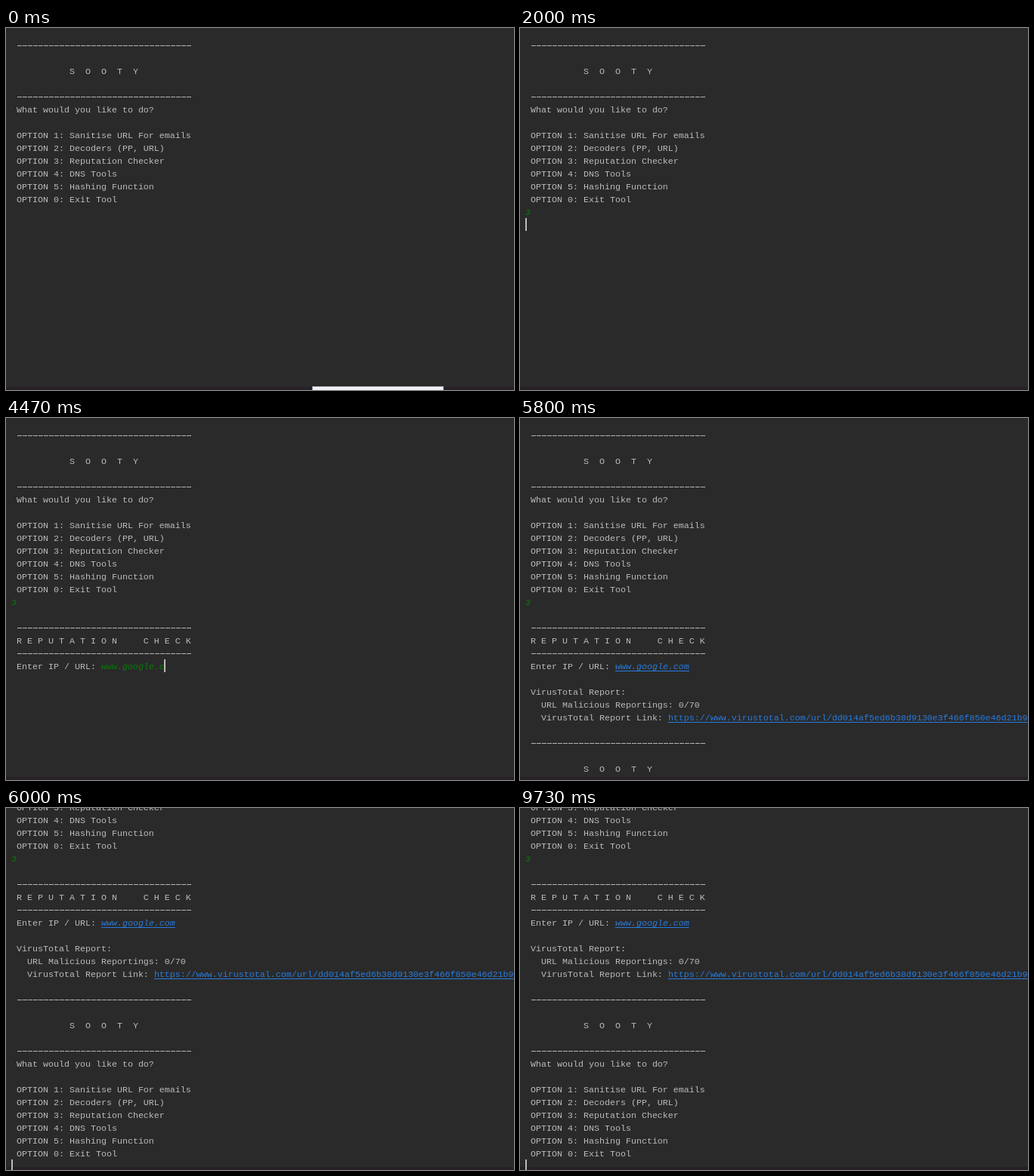
An HTML page for the animation above (9790 ms loop, 672 by 480 pixels).

```html
<!DOCTYPE html>
<html lang="en">
<head>
<meta charset="utf-8">
<title>Reputation check in a terminal</title>
<style>
  html, body { margin: 0; width: 100%; height: 100%; overflow: hidden; background: #2a2a2a; }
  #stage { position: relative; width: 672px; height: 480px; overflow: hidden; }
  #view { position: absolute; inset: 0 0 4px 0; overflow: hidden; }
  #lines {
    position: absolute; left: 7px; top: 16px;
    font: 11.665px/17px "Liberation Mono", "Courier New", monospace;
    color: #bbb; white-space: pre;
  }
  #lines div { height: 17px; }
  .rule {
    width: 231px; margin-left: 7px; color: transparent;
    background: repeating-linear-gradient(90deg, transparent 0 1px, #b4b4b4 1px 7px) 0 7px / 100% 1px no-repeat;
  }
  .input { color: #007f00; font-style: italic; }
  .link { color: #287bde; text-decoration: underline 1px; text-underline-offset: 2px; text-decoration-skip-ink: none; }
  #strip { position: absolute; left: 0; right: 0; bottom: 0; height: 4px; background: #272026; }
  #popup {
    position: absolute; left: 405px; top: 475px; width: 174px; height: 5px;
    box-sizing: border-box; border: 1px solid #a9a9b0; border-bottom: 0; background: #f1f1f5;
  }
  #caret { position: absolute; width: 2px; height: 17px; background: #bbb; }
</style>
</head>
<body>
<div id="stage">
  <div id="view"><div id="lines"></div></div>
  <div id="strip"></div>
  <div id="popup"></div>
  <div id="caret"></div>
</div>
<script>
const LOOP = 9790, TOP = 14, LEFT = 7, ROW = 17, CELL = 7;
const ADDRESS = 'www.google.com';
const REPORT = 'https://www.virustotal.com/url/dd014af5ed6b38d9130e3f466f850e46d21b9';
const $ = id => document.getElementById(id);
const rule = '-'.repeat(33);

const menu = [
  rule, '', ' '.repeat(11) + 'S  O  O  T  Y', '', rule,
  ' What would you like to do?', '',
  ' OPTION 1: Sanitise URL For emails',
  ' OPTION 2: Decoders (PP, URL)',
  ' OPTION 3: Reputation Checker',
  ' OPTION 4: DNS Tools',
  ' OPTION 5: Hashing Function',
  ' OPTION 0: Exit Tool'
];

// Output blocks: [time shown, rows]
const blocks = [
  [0, menu],
  [0, ['', '']],
  [2200, [rule, ' R E P U T A T I O N     C H E C K', rule, ' Enter IP / URL: ']],
  [5800, ['', ' VirusTotal Report:', '   URL Malicious Reportings: 0/70',
    '   VirusTotal Report Link: ', '', ...menu]]
];

const rows = [];
for (const [at, texts] of blocks) {
  for (const text of texts) {
    const el = document.createElement('div');
    el.textContent = text;
    if (text === rule) el.className = 'rule';
    $('lines').append(el);
    rows.push({ el, at });
  }
}

function addSpan(row, className, text = '') {
  const span = document.createElement('span');
  span.className = className;
  span.textContent = text;
  rows[row].el.append(span);
  return span;
}
const choice = addSpan(13, 'input');
const address = addSpan(18, 'input');
addSpan(22, 'link', REPORT);

const keyTimes = [2930, 3130, 3270, 3470, 3600, 3800, 3930, 4070, 4130, 4270, 4400, 4470, 4600, 4800];

// [time, row, column] of the caret
const caretPlaces = [[0, 13, 0], [1730, 13, 1], [2000, 14, 0], [2200, 18, 17], [5070, 19, 0], [5800, 37, 0]];
const caretSwitches = [[0, 0], [200, 1], [1270, 0], [1730, 1], [2730, 0], [2930, 1],
  [6530, 0], [7070, 1], [7600, 0], [8130, 1], [8670, 0], [9200, 1]];
const scrolls = [[0, 0], [5930, 49], [6000, 177]];

const stepAt = (steps, t) => steps.findLast(([at]) => at <= t);

function draw(t) {
  for (const { el, at } of rows) el.style.visibility = t >= at ? 'visible' : 'hidden';

  const typed = keyTimes.filter(at => at <= t).length;
  choice.textContent = t >= 1730 ? '3' : '';
  address.textContent = ADDRESS.slice(0, typed);
  address.className = t >= 5070 ? 'input link' : 'input';

  const scroll = stepAt(scrolls, t)[1];
  $('lines').style.transform = `translateY(${-scroll}px)`;

  const [, row, column] = stepAt(caretPlaces, t);
  const cells = column + (row === 18 ? typed : 0);
  const caret = $('caret').style;
  caret.left = LEFT + Math.max(0, cells * CELL - 1) + 'px';
  caret.top = TOP + row * ROW - scroll + 'px';
  caret.opacity = stepAt(caretSwitches, t)[1];

  $('popup').style.opacity = Math.max(0, Math.min(1, (270 - t) / 200));
}

const start = performance.now();
function tick() {
  draw((performance.now() - start) % LOOP);
  requestAnimationFrame(tick);
}
tick();
</script>
</body>
</html>
```
